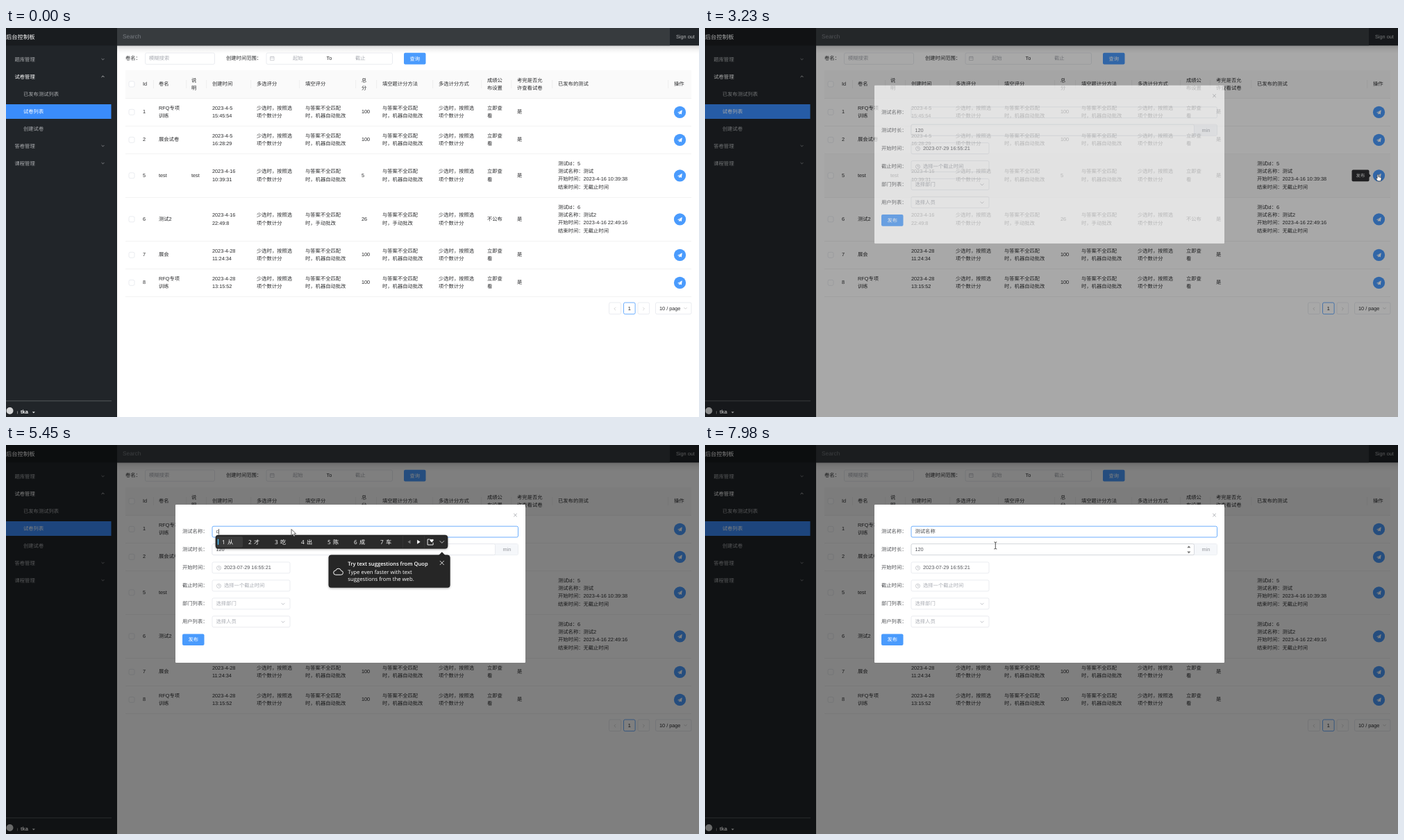
An HTML page that plays this animation: 998x561 px, repeating every 8 s.

```html
<!DOCTYPE html>
<html>
<head>
<meta charset="utf-8">
<style>
  html, body { margin: 0; width: 100%; height: 100%; overflow: hidden; background: #fff; }
  svg { display: block; width: 100vw; height: 100vh; }
  text { font-family: "Liberation Sans", "Noto Sans CJK SC", sans-serif; text-rendering: geometricPrecision; white-space: pre; }
  .ime text { font-family: "Open Sans", "Noto Sans CJK SC", sans-serif; }
</style>
</head>
<body>
<svg id="stage" viewBox="0 0 998 561" preserveAspectRatio="none"></svg>
<script>
const LOOP = 8000, STEP = 101.18;
const BLUE = '#4a9bfd', INK = '#2b2c2e', GREY = '#a8abb2', LINE = '#dcdfe6';
const stage = document.getElementById('stage');
const $ = id => document.getElementById(id);

// Drawing helpers; text is placed by its vertical centre.
const text = (x, y, s, fill = INK, size = 7.3, extra = '') =>
  `<text x="${x}" y="${y + size * .36}" fill="${fill}" font-size="${size}" ${extra}>${s}</text>`;
const rect = (x, y, w, h, fill, extra = '') =>
  `<rect x="${x}" y="${y}" width="${w}" height="${h}" fill="${fill}" ${extra}/>`;
const path = (d, stroke, width = .7, extra = '') =>
  `<path d="${d}" fill="none" stroke="${stroke}" stroke-width="${width}" ${extra}/>`;
const box = (x, y, w, h, extra = '') =>
  rect(x, y, w, h, '#fff', `rx="2" stroke="${LINE}" stroke-width=".6" ${extra}`);
const group = (id, body, extra = '') => `<g id="${id}" ${extra}>${body}</g>`;
const chevron = (x, y, color, r = 2, dir = 1) =>
  path(`M${x - r} ${y - dir * r / 2}l${r} ${dir * r}l${r} ${-dir * r}`, color);
const lines = (x, y, s, pitch = 11.4) => {
  const parts = s.split('|');
  return parts.map((p, i) => text(x, y + (i - (parts.length - 1) / 2) * pitch, p)).join('');
};
const button = (x, y, label) =>
  rect(x, y, 31.5, 16.7, BLUE, 'rx="2"') + text(x + 8.4, y + 8.4, label, '#fff');
const clock = (x, y) =>
  `<circle cx="${x}" cy="${y}" r="3" fill="none" stroke="${GREY}" stroke-width=".6"/>` + path(`M${x} ${y - 2}v2.2h1.6`, GREY, .6);

function sidebar() {
  const items = [['题库管理', 0, 1], ['试卷管理', 0, -1], ['已发布测试列表', 1], ['试卷列表', 1],
                 ['创建试卷', 1], ['答卷管理', 0, 1], ['课程管理', 0, 1]];
  return rect(0, 0, 160, 561, '#212529') + rect(0, 110, 151.5, 21, '#3a8cfb') +
    items.map(([label, sub, dir], i) => {
      const y = 45 + i * 25, color = i === 1 || i === 3 ? '#fff' : '#a9abae';
      return text(sub ? 25 : 12.5, y, label, color) + (dir ? chevron(139.5, y, color, 1.9, dir) : '');
    }).join('') +
    rect(0, 537.5, 152, .7, '#6b6e71') +
    '<circle cx="5.5" cy="552" r="5" fill="#d4d5d6"/>' + rect(16, 552.5, .7, 4, '#aaa') +
    text(21, 553.5, 'tka', '#fff', 7.5, 'font-weight="700"') +
    '<path d="M37.8 553.5h4l-2 2z" fill="#fff"/>';
}

function topbar() {
  return rect(160, 25, 838, 12, 'url(#shade)') +
    rect(0, 0, 998, 25.3, '#212529') + rect(0, 0, 160, 25.3, '#191c1f') +
    rect(160, 0, 796, 25.3, '#373b3e') +
    text(0, 13, '后台控制板', '#fff', 8.32) + text(168, 12.5, 'Search', '#777b80', 8.32) +
    text(965, 12.3, 'Sign out', '#b5b7b9');
}

function filters() {
  return text(172, 43.7, '卷名：') + box(200.5, 36, 100, 16.3) + text(206, 43.8, '模糊搜索', GREY) +
    text(317, 43.7, '创建时间范围：') + box(375, 36, 181.5, 16.3) +
    path('M380.5 41.5h5.6v5h-5.6zM380.5 43.3h5.6M382 40.5v1.6M384.6 40.5v1.6', GREY, .5) +
    text(413, 43.8, '起始', GREY) + text(461.5, 43.8, 'To') + text(503, 43.8, '截止', GREY) +
    button(573, 35.8, '查询');
}

const columns = [197, 220, 267, 297, 361, 431, 512, 542, 623, 693, 736, 795];
const heads = ['Id', '卷名', '说|明', '创建时间', '多选评分', '填空评分', '总|分', '填空题计分方法',
               '多选计分方式', '成绩公|布设置', '考完是否允|许查看试卷', '已发布的测试'];
const AUTO = '与答案不全匹配|时，机器自动批改', MANUAL = '与答案不全匹配|时，手动批改';
const PICK = '少选时，按照选|项个数计分', NOW = '立即查|看';
const report = (id, name, start) => `测试Id：${id}|测试名称：${name}|开始时间：${start}|结束时间：无截止时间`;
const rows = [
  { top: 101.5, h: 40, cells: ['1', 'RFQ专项|训练', '', '2023-4-5|15:45:54', PICK, AUTO, '100', AUTO, PICK, NOW, '是', ''] },
  { top: 141.5, h: 40, cells: ['2', '展会试卷', '', '2023-4-5|16:28:29', PICK, AUTO, '100', AUTO, PICK, NOW, '是', ''] },
  { top: 181.5, h: 63, cells: ['5', 'test', 'test', '2023-4-16|10:39:31', PICK, AUTO, '5', AUTO, PICK, NOW, '是', report(5, '测试', '2023-4-16 10:39:38')] },
  { top: 244.5, h: 63, cells: ['6', '测试2', '', '2023-4-16|22:49:8', PICK, MANUAL, '26', MANUAL, PICK, '不公布', '是', report(6, '测试2', '2023-4-16 22:49:16')] },
  { top: 307.5, h: 40, cells: ['7', '展会', '', '2023-4-28|11:24:34', PICK, AUTO, '100', AUTO, PICK, NOW, '是', ''] },
  { top: 347.5, h: 40, cells: ['8', 'RFQ专项|训练', '', '2023-4-28|13:15:52', PICK, AUTO, '100', AUTO, PICK, NOW, '是', ''] }
];
const middle = r => r.top + r.h / 2 - .5;
const checkbox = y => box(177, y - 4, 8, 8);

function table() {
  const rules = [212, 259.5, 288.5, 352.5, 422.5, 503.5, 533.5, 614.5, 684.5, 727.5, 786.5, 953.5];
  return rect(172, 61, 815, 40.5, '#fafafa') + checkbox(81) +
    rules.map(x => rect(x, 75, .6, 12, '#e6e6e6')).join('') +
    heads.map((h, i) => lines(columns[i], 80.7, h)).join('') + text(962, 80.7, '操作') +
    rect(172, 101, 815, .6, '#ececec') +
    rows.map((r, i) => {
      const y = middle(r);
      return rect(172, r.top, 815, r.h - .4, '#fafafa', `id="row${i}" opacity="0"`) + checkbox(y + .3) +
        r.cells.map((c, k) => lines(columns[k], y - .3, c, k === 11 ? 11.2 : 11.4)).join('') +
        rect(172, r.top + r.h - .5, 815, .6, '#ececec') +
        `<circle cx="970.5" cy="${y + .4}" r="8.6" fill="${BLUE}"/>` +
        `<path d="M967 ${y + .9}l6.8-3.7-1 6.4-2.4-1.2-1.4 1.3v-2l3-3.1-3.7 2.8z" fill="#fff"/>`;
    }).join('');
}

function pager() {
  return box(868.5, 396, 17, 16.6) + box(889.5, 396, 16.6, 16.6, `style="stroke:${BLUE};stroke-width:.8"`) + box(910, 396, 16.6, 16.6) +
    path('M878 402.8l-2.2 2.2 2.2 2.2M917.2 402.8l2.2 2.2-2.2 2.2', '#bbb', .6) +
    text(895.7, 404.6, '1', '#222') + box(935.5, 396, 51.5, 16.6) + text(941, 404, '10 / page') +
    chevron(978.5, 404.2, '#bbb', 2);
}

const tips = () => [2, 3, 4].map(i => {
  const y = middle(rows[i]) + .4;
  return group('tip' + i, rect(931.5, y - 8.4, 25, 16.8, '#303133', 'rx="2"') +
    `<path d="M956 ${y - 2.8}l2.8 2.8-2.8 2.8z" fill="#303133"/>` + text(937.5, y + .2, '发布', '#fff', 6.4), 'opacity="0"');
}).join('');

function dialog() {
  const labels = ['测试名称', '测试时长', '开始时间', '截止时间', '部门列表', '用户列表'];
  const rowY = i => 125 + i * 25.95;
  return rect(244, 86, 504, 228, '#fff', 'rx="1"') +
    path('M731.2 98.8l4.6 4.6M735.8 98.8l-4.6 4.6', '#909399') +
    labels.map((l, i) => text(254, rowY(i) - .3, l + '：', '#4f5155')).join('') +
    box(297, 117.2, 440.5, 15.8, 'id="nameBox"') +
    box(297, 142.6, 440.5, 16) + rect(704.5, 143, 32.6, 15.2, '#f5f7fa') + text(715.5, 150.4, 'min', '#909399') +
    box(297, 142.6, 407.5, 16, 'id="timeBox"') + text(302.5, 150.5, '120', '#55575c') +
    group('spin', '<path d="M694.3 148.2l2.5-3 2.5 3zM694.3 153.4l2.5 3 2.5-3z" fill="#777"/>') +
    [2, 3, 4, 5].map(i => box(297, rowY(i) - 8, 112, 16)).join('') +
    clock(306.5, rowY(2) + .4) + text(314, rowY(2) - .3, '2023-07-29 16:55:21', '#55575c') +
    clock(306.5, rowY(3) + .4) + text(314, rowY(3) - .3, '选择一个截止时间', GREY) +
    text(302.5, rowY(4) - .3, '选择部门', GREY) + chevron(399, rowY(4) + .3, GREY, 2.4) +
    text(302.5, rowY(5) - .3, '选择人员', GREY) + chevron(399, rowY(5) + .3, GREY, 2.4) +
    button(254, 272.4, '发布') +
    text(302.5, 124.7, '', '#45474b', 7.3, 'id="typed"') + rect(302.3, 121, .7, 8, '#222', 'id="caret"');
}

function inputMethod(x, words) {
  let at = x + 1.5, out = '';
  words.split(' ').forEach((word, i) => {
    const wide = word.length * (/[a-z]/.test(word) ? 4.32 : 8.2);
    const w = Math.max(38, wide + 21.5);
    if (!i) out += rect(at, 132, w - .5, 15.5, '#3a3a3a', 'rx="2"') + rect(at + 1.3, 135.5, 1.4, 8.5, '#4cc2ff', 'rx=".7"');
    out += text(at + 7.5, 139.8, i + 1, '#fff', 8.2) + text(at + 15.5, 139.8, word, '#fff', 8.2);
    at += w;
  });
  const end = at + 58.3, left = end - 163;
  return rect(x, 130, end + 8.2 - x, 19.3, '#2a2a2a', 'rx="3.5" stroke="#111" stroke-width=".5" filter="url(#soft)"') + out +
    rect(at + 1.5, 131, .5, 17.5, '#3c3c3c') + rect(at + 33, 131, .5, 17.5, '#3c3c3c') +
    `<path d="M${at + 13} 137l-4 2.7 4 2.7z" fill="#777"/><path d="M${at + 22.7} 136.7l4.4 3-4.4 3z" fill="#fff"/>` +
    path(`M${at + 41} 136h-3.4v8h8v-3.4`, '#fff', .9) +
    `<path d="M${at + 43.6} 140.5l-2.4-2.4c-1-2 1.6-3.2 2.4-1.4c.8-1.8 3.4-.6 2.4 1.4z" fill="#fff"/>` +
    chevron(end, 139.8, '#fff', 3.2) +
    rect(left, 158.8, 174.5, 46.8, '#262626', 'rx="3.5" stroke="#111" stroke-width=".5" filter="url(#soft)"') +
    `<path d="M${end - 5} 159.2l5-5 5 5z" fill="#262626"/>` +
    path(`M${left + 10} 187.2h7.5a2.9 2.9 0 0 0 .4-5.8a4.1 4.1 0 0 0-7.9-.4a3.1 3.1 0 0 0 0 6.2z`, '#fff', 1) +
    text(left + 27.5, 171.5, 'Try text suggestions from Quop', '#fff', 7.65, 'font-weight="600"') +
    text(left + 27.5, 183, 'Type even faster with text', '#fff', 7.75) +
    text(left + 27.5, 193.6, 'suggestions from the web.', '#fff', 7.75) +
    path(`M${end - 3} 167l6 6M${end + 3} 167l-6 6`, '#fff', .8);
}

const pointers =
  group('arrow', '<path d="M0 0v9.2l2.1-2 1.5 3.4 1.6-.7-1.5-3.3h2.9z" fill="#fff" stroke="#222" stroke-width=".7"/>') +
  group('hand', '<path d="M-.9 .6q.9-1.2 1.8 0v3l3.3.9q1 .5.8 1.8l-.8 3.4h-4.4l-2.6-3.6q.3-1.3 1.9 0z" fill="#fff" stroke="#222" stroke-width=".6"/>') +
  group('beam', path('M-2-5q2 0 2 1q0-1 2-1M0-4v8M-2 5q2 0 2-1q0 1 2 1', '#222', .8));

stage.innerHTML = `<defs>
  <linearGradient id="shade" x2="0" y2="1"><stop stop-color="#000" stop-opacity=".16"/><stop offset=".5" stop-color="#000" stop-opacity=".05"/><stop offset="1" stop-color="#000" stop-opacity="0"/></linearGradient>
  <filter id="soft" x="-5%" y="-30%" width="110%" height="170%"><feDropShadow dx="0" dy="1.2" stdDeviation="1.5" flood-opacity=".3"/></filter></defs>` +
  rect(0, 0, 998, 561, '#fff') + sidebar() + topbar() + filters() + table() + pager() + tips() +
  rect(0, 0, 998, 561, '#000', 'id="mask" opacity="0"') + group('dialog', dialog()) +
  group('ime', '', 'class="ime"') + group('pointer', pointers);

// Time, x, y of the pointer.
const moves = [[290, 614, 517], [390, 735, 484], [490, 825, 453], [690, 825, 453], [790, 842, 444], [990, 922, 388],
  [1190, 966, 336], [1300, 969, 327], [1500, 970, 326], [1610, 970, 317], [1810, 969, 272], [1910, 965, 248.5],
  [2010, 967, 226], [2110, 969, 213], [2320, 969, 211], [3430, 969, 211], [3530, 900, 214], [3630, 812, 209],
  [3730, 690, 186], [3830, 560, 157], [3930, 465, 134], [4040, 422, 124], [4140, 411, 121.5],
  [7470, 411, 121.5], [7570, 413, 130], [7670, 417, 141], [7770, 418, 144.5], [8000, 418.3, 145]];

// Time, committed text, letters being composed, candidates.
const typing = [[0, '', '', ''], [5450, '', 'c', '从 才 吃 出 陈 成 车'], [5550, '', 'ce', '测 策 册 侧 厕 恻 色'],
  [5750, '', 'ces', '测试 测 策 侧 册 厕 恻'], [6150, '测试', '', ''], [6360, '测试', 'm', '吗 没 们 买 面 慢 美'],
  [6460, '测试', 'mi', '米 密 迷 秘 蜜 觅 眯'], [6560, '测试', 'min', '民 敏 闽 闵 皿 抿 悯'],
  [6670, '测试', 'ming', '名 明 命 铭 鸣 冥 茗'], [6770, '测试', 'ming', '名 明 命 铭 mingle 鸣 冥'],
  [6970, '测试', 'mingc', '名称 名词 名次 名册 名 明 命'], [7270, '测试名称', '', '']];

const ramp = (t, a, b) => Math.min(1, Math.max(0, (t - a) / (b - a)));
const fade = (t, a, b, c, d) => ramp(t, a, b) - ramp(t, c, d);

// The default CSS "ease" curve, solved by bisection.
function ease(p) {
  let lo = 0, hi = 1;
  for (let i = 0; i < 20; i++) {
    const u = (lo + hi) / 2, v = 1 - u;
    if (3 * v * v * u * .25 + 3 * v * u * u * .25 + u ** 3 < p) lo = u; else hi = u;
  }
  return p <= 0 ? 0 : p >= 1 ? 1 : 3 * (1 - lo) ** 2 * lo * .1 + 3 * (1 - lo) * lo * lo + lo ** 3;
}

function pointerAt(t) {
  const i = Math.max(1, moves.findIndex(m => m[0] >= t));
  const [a, b] = [moves[i - 1], moves[i]], p = ramp(t, a[0], b[0]);
  return [a[1] + (b[1] - a[1]) * p, a[2] + (b[2] - a[2]) * p];
}

const opacity = (id, v) => $(id).setAttribute('opacity', v);
let shown = -1;

function type(index) {
  if (index === shown) return;
  shown = index;
  const [, done, letters, words] = typing[index];
  $('typed').textContent = done + letters;
  $('caret').setAttribute('x', 302.3 + (done + letters ? $('typed').getComputedTextLength() + .2 : 0));
  $('ime').innerHTML = words ? inputMethod(302 + done.length * 7.4, words) : '';
}

function draw(time) {
  const t = time < 282 ? 0 : 290 + STEP * Math.floor((time - 282) / STEP);
  const [x, y] = pointerAt(t);
  const onButton = t < 3450 && rows.some(r => Math.hypot(x - 970.5, y - middle(r)) < 9);
  const kind = onButton ? 'hand' : (t > 4120 && t < 5430) || t > 7550 ? 'beam' : 'arrow';
  opacity('pointer', t >= 290 ? 1 : 0);
  $('pointer').setAttribute('transform', `translate(${x} ${y})`);
  ['arrow', 'hand', 'beam'].forEach(k => opacity(k, k === kind ? 1 : 0));

  rows.forEach((r, i) => opacity('row' + i, t >= 290 && t < 3500 && y >= r.top && y < r.top + r.h ? 1 : 0));
  opacity('tip4', fade(t, 1300, 1500, 2010, 2210));
  opacity('tip3', fade(t, 1810, 2010, 2120, 2320));
  opacity('tip2', fade(t, 2110, 2310, 3430, 3630));

  const open = ease(ramp(t, 3105, 3405));
  opacity('mask', open / 2);
  opacity('dialog', open);
  $('dialog').setAttribute('transform', `translate(0 ${(open - 1) * 10.4})`);

  const focus = ramp(t, 4240, 4500);
  const mix = (a, b) => Math.round(a + (b - a) * focus);
  $('nameBox').setAttribute('stroke', `rgb(${mix(220, 74)},${mix(223, 155)},${mix(230, 253)})`);
  $('nameBox').setAttribute('stroke-width', .6 + focus * .2);
  $('timeBox').setAttribute('stroke', t > 7650 ? '#c0c4cc' : LINE);
  opacity('spin', t > 7650 ? 1 : 0);
  opacity('caret', (t > 4400 && t < 4930) || (t > 5430 && t < 7750) ? 1 : 0);

  type(typing.findLastIndex(k => k[0] <= t + 12));
}

function tick(now) {
  draw(now % LOOP);
  requestAnimationFrame(tick);
}
draw(0);
requestAnimationFrame(tick);
</script>
</body>
</html>
```
